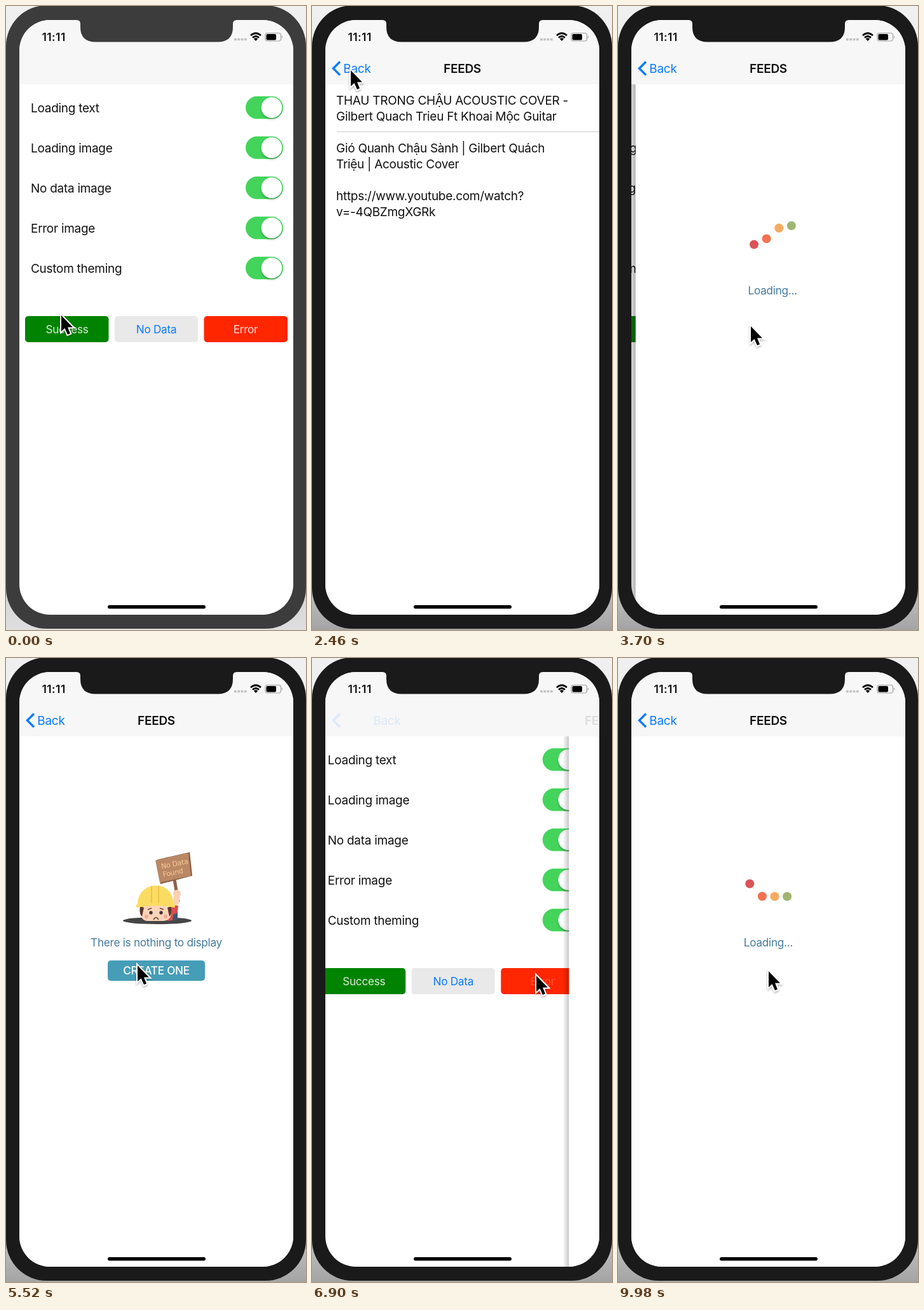
These frames come from a looping animation (472x980 px, 10000 ms). An HTML page:

```html
<!DOCTYPE html>
<html lang="en">
<head>
<meta charset="utf-8">
<title>Feeds demo</title>
<style>
  html, body { margin: 0; width: 100%; height: 100%; overflow: hidden; background: #eee; }
  svg { display: block; width: 472px; height: 980px; }
  text { font: 19px Inter, "Noto Sans", sans-serif; letter-spacing: -.28px; font-feature-settings: "calt" 0; fill: #111; white-space: pre; }
  .mid { text-anchor: middle; }
  .small { font-size: 17.2px; }
  .bold { font-weight: 600; }
  .blue { fill: #0a7aff; }
  .theme { fill: #457b9d; }
  .white { fill: #fff; }
  .sign { font: 11px "DejaVu Sans", sans-serif; fill: #f6c99b; }
</style>
</head>
<body>
<svg viewBox="0 0 472 980">
  <defs>
    <clipPath id="screen"><rect x="21" y="22" width="431" height="934" rx="48"/></clipPath>
    <linearGradient id="backdrop" x2="0" y2="1">
      <stop offset="0" stop-color="#f0f0f0"/><stop offset=".9" stop-color="#d0d0d0"/><stop id="floor" offset="1"/>
    </linearGradient>
    <linearGradient id="edge"><stop offset="0" stop-opacity="0"/><stop offset="1" stop-opacity=".22"/></linearGradient>
    <filter id="soft" x="-50%" y="-50%" width="200%" height="200%"><feDropShadow dx="0" dy="2" stdDeviation="1.5" flood-opacity=".3"/></filter>
    <g id="switch">
      <rect x="377" y="-17.7" width="59" height="35.5" rx="17.7" fill="#43d55b"/>
      <circle cx="418" r="16.3" fill="#fff" filter="url(#soft)"/>
    </g>
  </defs>

  <rect width="472" height="980" fill="url(#backdrop)"/>
  <rect id="bezel" y="-1" width="472" height="979" rx="64"/>

  <g clip-path="url(#screen)">
    <rect x="21" y="22" width="431" height="934" fill="#fff"/>
    <g id="settings">
      <g id="options"></g>
      <rect x="30" y="487" width="131.5" height="41" rx="5" fill="#008300"/>
      <rect x="171" y="487" width="131" height="41" rx="5" fill="#e9e9ea"/>
      <rect x="311.5" y="487" width="131.5" height="41" rx="5" fill="#ff2600"/>
      <text id="success" class="mid small white" x="96" y="513.7">Success</text>
      <text id="nodata" class="mid small blue" x="236.5" y="513.7">No Data</text>
      <text id="error" class="mid small white" x="377" y="513.7">Error</text>
    </g>
    <rect id="dim" x="21" y="123" width="431" height="833"/>

    <g id="feeds">
      <rect x="11" y="123" width="10" height="833" fill="url(#edge)"/>
      <rect x="21" y="123" width="431" height="833" fill="#fff"/>
      <g id="loading">
        <g id="dots"></g>
        <text class="mid small theme" x="236.5" y="453">Loading...</text>
      </g>
      <g id="list">
        <text x="38" y="155">THAU TRONG CHẬU ACOUSTIC COVER -</text>
        <text x="38" y="180">Gilbert Quach Trieu Ft Khoai Mộc Guitar</text>
        <path d="M39 197.5H452" stroke="#c8c8cc"/>
        <text x="38" y="230">Gió Quanh Chậu Sành | Gilbert Quách</text>
        <text x="38" y="255">Triệu | Acoustic Cover</text>
        <text x="38" y="305">https://www.youtube.com/watch?</text>
        <text x="38" y="330">v=-4QBZmgXGRk</text>
      </g>
      <g id="empty">
        <ellipse cx="238" cy="412.5" rx="54" ry="5.5" fill="#454545"/>
        <path d="M265 348l6 35" stroke="#8f6047" stroke-width="5"/>
        <path d="M237 317l52-12 4 37-50 13z" fill="#85573f"/>
        <path d="M235 318l52-12 4 36-49 11z" fill="#ba8864"/>
        <g transform="translate(245 331) rotate(-11)">
          <text class="sign">No Data</text>
          <text class="sign" y="13">Found</text>
        </g>
        <path d="M261 387l10 2-2 22-15 2z" fill="#d94c4f"/>
        <path d="M263 403l7-3v11l-8 2z" fill="#3d5573"/>
        <path d="M264 374l10 1-3 13-9-2z" fill="#fbd0b4"/>
        <circle cx="269" cy="370" r="6" fill="#fbd0b4"/>
        <path d="M211 389H260Q263 413 248 413H222Q209 412 211 389" fill="#fcd4b8"/>
        <path d="M211 390q-2 12 3 16l3-14M260 390q2 12-3 16l-3-14" fill="#59382f"/>
        <path d="M207 386C209 348 262 348 263 384Q268 388 265 392Q235 386 206 392Q202 390 207 386" fill="#fbdc62"/>
        <path d="M229 358v27M240 358v27" stroke="#eec548" stroke-width="2"/>
        <g fill="#423331"><circle cx="228" cy="400" r="2.7"/><circle cx="244" cy="400" r="2.7"/></g>
        <path d="M223 395l6-2M242 393l6 2M232 411q4-7 8 0" fill="none" stroke="#6b4439" stroke-width="1.6"/>
        <g fill="#f5aa98"><circle cx="221" cy="406" r="3"/><circle cx="251" cy="406" r="3"/></g>
        <text class="mid small theme" x="236.5" y="453">There is nothing to display</text>
        <rect x="160" y="475" width="153" height="32" rx="5" fill="#469db8"/>
        <text class="mid small white" x="236.5" y="497" font-weight="500" style="font-weight:500">CREATE ONE</text>
      </g>
    </g>

    <rect x="21" y="22" width="431" height="101" fill="#f7f7f7"/>
    <path id="chevron" d="M44 87.5L33.5 98 44 108.5" fill="none" stroke="#0a7aff" stroke-width="3.4"/>
    <text id="back" class="blue" x="49.3" y="105">Back</text>
    <text id="heading" class="mid bold" x="236.5" y="105">FEEDS</text>
    <text class="bold" x="56.5" y="54.5" style="font-size:17.5px;letter-spacing:.4px">11:11</text>

    <path d="M359 52.5H379" stroke="#c2c2c2" stroke-width="3.5" stroke-dasharray="3.8 1.5"/>
    <path d="M385 46.3Q393 39.2 401 46.3M388 49.7Q393 45.3 398 49.7" fill="none" stroke="#000" stroke-width="2.7"/>
    <path d="M389.8 51.6Q393 49 396.2 51.6L393 55z"/>
    <rect x="408" y="42.5" width="24.5" height="12.5" rx="3.5" fill="none" stroke="#a0a0a0" stroke-width="1.2"/>
    <rect x="409.5" y="44" width="15.5" height="9.5" rx="2"/>
    <path d="M434 46.5q2.5 2.2 0 4.5z" fill="#a0a0a0"/>
    <rect x="160" y="941" width="154" height="5.5" rx="2.75"/>
  </g>
  <path id="notch" d="M111 20V22Q117 22 117 28V33Q117 56.500 141 56.500H333Q357 56.500 357 33V28Q357 22 363 22V20z"/>
  <path id="cursor" d="M0 0V25L5.5 20 10 30 14 28.3 10 18.500H18z" stroke="#fff" stroke-width="4" paint-order="stroke" filter="url(#soft)"/>
</svg>

<script>
const $ = id => document.getElementById(id);
const set = (id, attrs) => { for (const k in attrs) $(id).setAttribute(k, attrs[k]); };
const shift = (x, y = 0) => `translate(${x} ${y})`;

const labels = ["Loading text", "Loading image", "No data image", "Error image", "Custom theming"];
$("options").innerHTML = labels.map((label, i) => {
  const y = 159.5 + 63 * i;
  return `<text x="39" y="${y + 7}">${label}</text><use href="#switch" y="${y}"/>`;
}).join("");

const dotColors = ["#da5357", "#f3714f", "#f6ab5e", "#a0b572"];
$("dots").innerHTML = dotColors.map((c, i) => `<circle cx="${207.3 + 19.6 * i}" r="7" fill="${c}"/>`).join("");

// Page changes: [time, 1 to open the feed or 0 to go back]
const pageChanges = [[250, 1], [2600, 0], [3264, 1], [6632, 0], [7050, 1]];
// Pointer stops: [time, x, y]
const stops = [
  [0, 87, 486], [1500, 87, 486], [2200, 61, 101], [2650, 61, 101], [3120, 209, 503],
  [4700, 209, 503], [5300, 207, 483], [5850, 207, 483], [6400, 61, 101], [6620, 61, 101],
  [6880, 353, 499], [7200, 353, 501], [8400, 353, 501], [9200, 237, 492], [10000, 237, 492]
];

// 0 when the feed fills the screen, 1 when it is off to the right
function feedOffset(t) {
  const change = pageChanges.filter(c => c[0] <= t).pop();
  if (!change) return 1;
  const d = (t - change[0]) * .014;
  const rest = (1 + d) * Math.exp(-d);
  return change[1] ? rest : 1 - rest;
}

function pointer(t) {
  const i = stops.findIndex(s => s[0] > t);
  const [t0, x0, y0] = stops[i - 1], [t1, x1, y1] = stops[i];
  const u = (t - t0) / (t1 - t0), e = u * u * (3 - 2 * u);
  return shift(x0 + (x1 - x0) * e, y0 + (y1 - y0) * e);
}

function bounce(t) {
  const phase = (t + (t < 7000 ? 865 : 135)) % 1000;
  [...$("dots").children].forEach((dot, i) => {
    const u = phase / 500 - .23 * i;
    dot.setAttribute("cy", 374.5 - (u > 0 && u < 1 ? 30 * Math.sin(Math.PI * u) : 0));
  });
}

function draw(t) {
  const off = feedOffset(t), shown = 1 - off;
  const nav = Math.max(0, off - .02) / .98;
  const within = (a, b) => t >= a && t < b;
  const body = t < 100 ? "#3c3c3c" : "#1a1a1a";
  set("bezel", { fill: body });
  set("notch", { fill: body });
  set("floor", { "stop-color": t < 100 ? "#dedede" : "#a4a4a4" });

  set("settings", { transform: shift(-129 * shown) });
  set("dim", { opacity: .1 * shown * shown });
  set("feeds", { transform: shift(431 * off), display: off < 1 ? "inline" : "none" });
  set("chevron", { opacity: 1 - nav });
  set("back", { opacity: 1 - nav, transform: shift(53 * nav) });
  set("heading", { opacity: 1 - nav, transform: shift(250 * nav) });

  set("success", { opacity: within(120, 300) ? .2 : .85 });
  set("nodata", { opacity: within(3150, 3300) ? .2 : 1 });
  set("error", { opacity: within(6860, 7100) ? .2 : .85 });

  const page = within(1700, 3264) ? "list" : within(4700, 7050) ? "empty" : "loading";
  for (const id of ["list", "empty", "loading"]) set(id, { display: id === page ? "inline" : "none" });
  bounce(t);
  set("cursor", { transform: pointer(t) });
}

function tick() {
  draw(performance.now() % 10000);
  requestAnimationFrame(tick);
}
tick();
</script>
</body>
</html>
```
